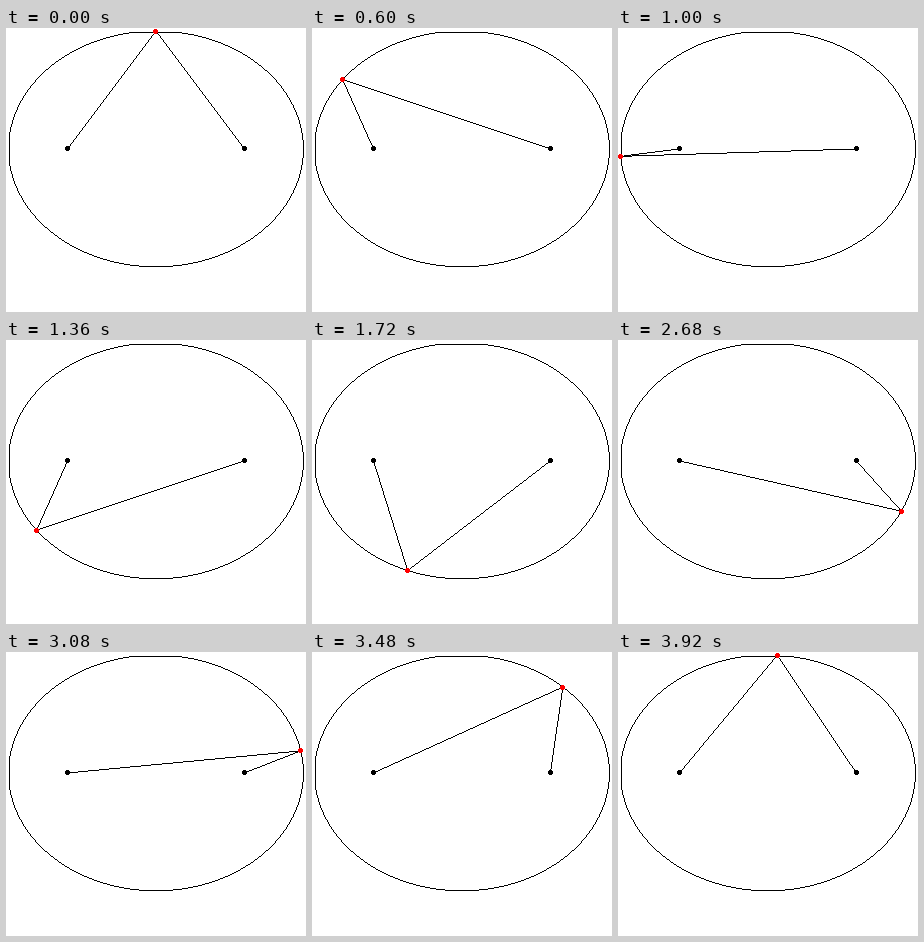
Write a matplotlib script that moves like this. It is 300 px wide and 284 px high and loops after 3.96 s.

```python
import numpy as np
import matplotlib.pyplot as plt
from matplotlib.animation import FuncAnimation

W, H = 300, 284
DPI = 100
FRAMES, INTERVAL = 99, 40
STEPS = 100          # positions around the ellipse
SKIPPED = 22         # the one position that is never shown

CX, CY = 149.45, 120.45
A, B = 147.5, 117.9
FOCUS_DIST = 88.4
FOCI = [(CX - FOCUS_DIST, CY), (CX + FOCUS_DIST, CY)]
LEFT, RIGHT, TOP, BOTTOM = 3, 297, 4, 238   # plot area of the outline
BLACK, RED = (0, 0, 0), (255, 0, 0)


def ellipse_point(turn):
    """Point after a fraction of a turn, counter-clockwise from the top."""
    t = 2 * np.pi * turn
    return CX - A * np.sin(t), CY - B * np.cos(t)


def pixels_between(lo, hi):
    lo, hi = sorted((round(lo), round(hi)))
    return np.arange(lo, hi + 1)


def line_pixels(p, q):
    """Pixels of a crisp one-pixel line, stepping along its longer axis."""
    (x0, y0), (x1, y1) = p, q
    if abs(x1 - x0) >= abs(y1 - y0):
        xs = pixels_between(x0, x1)
        ys = np.rint(y0 + (xs - x0) * (y1 - y0) / (x1 - x0)).astype(int)
    else:
        ys = pixels_between(y0, y1)
        xs = np.rint(x0 + (ys - y0) * (x1 - x0) / (y1 - y0)).astype(int)
    return xs, ys


def draw_dot(img, p, color):
    """Round dot, five pixels across."""
    x, y = round(p[0]), round(p[1])
    yy, xx = np.ogrid[:H, :W]
    img[(xx - x) ** 2 + (yy - y) ** 2 <= 5] = color


def make_background():
    img = np.full((H, W, 3), 255, dtype=np.uint8)
    for i in range(STEPS):
        xs, ys = line_pixels(ellipse_point(i / STEPS),
                             ellipse_point((i + 1) / STEPS))
        img[np.clip(ys, TOP, BOTTOM), np.clip(xs, LEFT, RIGHT)] = BLACK
    for focus in FOCI:
        draw_dot(img, focus, BLACK)
    return img


background = make_background()

fig = plt.figure(figsize=(W / DPI, H / DPI), dpi=DPI, facecolor="white")
ax = fig.add_axes([0, 0, 1, 1])
ax.axis("off")
view = ax.imshow(background, interpolation="nearest", aspect="auto")


def update(frame):
    step = frame + (frame >= SKIPPED)
    point = ellipse_point(step / STEPS)
    img = background.copy()
    for focus in FOCI:
        xs, ys = line_pixels(focus, point)
        img[ys, xs] = BLACK
    draw_dot(img, point, RED)
    view.set_data(img)
    return [view]


anim = FuncAnimation(fig, update, frames=FRAMES, interval=INTERVAL,
                     repeat=True, repeat_delay=0)
plt.show()
```
